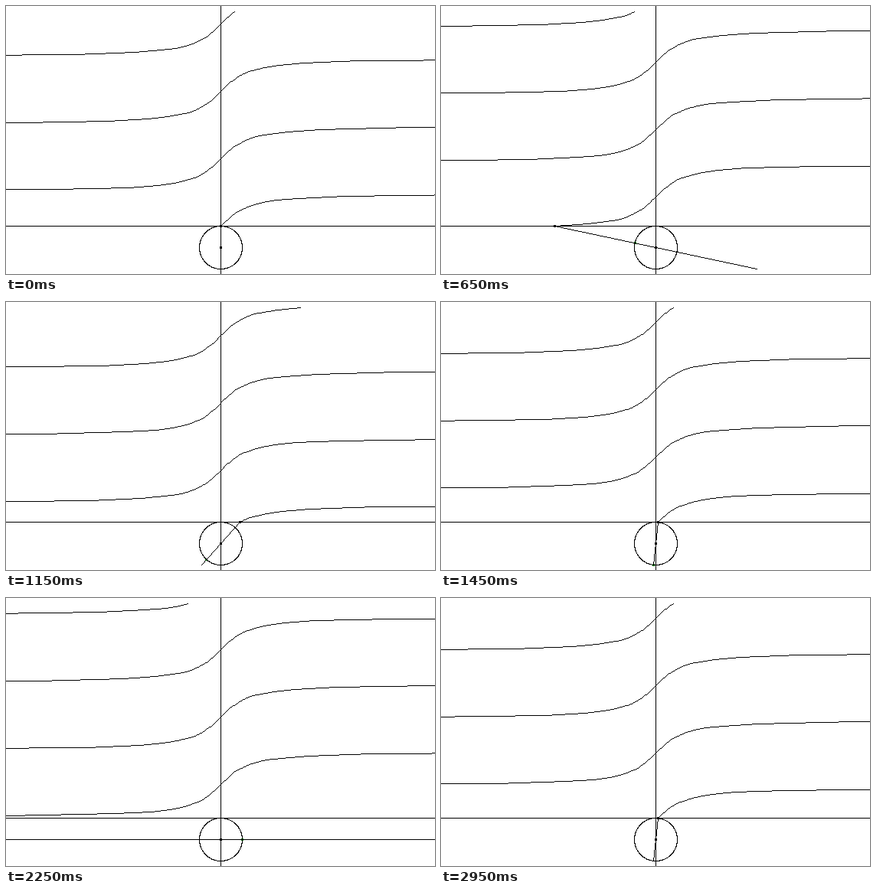
A matplotlib script that plays this animation: 560x350 px, repeating every 3 s.

```python
import numpy as np
import matplotlib.pyplot as plt
from matplotlib.animation import FuncAnimation

W, H, DPI = 560, 350, 100
FRAMES, INTERVAL = 60, 50
CX, CY, R = 280, 315, 28
TOP = CY - R
FAR = 1e5
BLACK, GREEN, WHITE = (0, 0, 0), (0, 160, 0), (255, 255, 255)

fig = plt.figure(figsize=(W / DPI, H / DPI), dpi=DPI, facecolor="white")
ax = fig.add_axes([0, 0, 1, 1])
ax.axis("off")


def plot(img, x, y, color=BLACK):
    """Set the pixels nearest to the given points."""
    x, y = np.rint(x).astype(int), np.rint(y).astype(int)
    ok = (x >= 0) & (x < W) & (y >= 0) & (y < H)
    img[y[ok], x[ok]] = color


def line(img, x0, y0, x1, y1):
    """One-pixel line without antialiasing."""
    x0, y0, x1, y1 = np.rint([x0, y0, x1, y1])
    n = int(max(abs(x1 - x0), abs(y1 - y0))) + 1
    plot(img, np.linspace(x0, x1, n), np.linspace(y0, y1, n))


def circle(img, x, y, r):
    a = np.linspace(0, 2 * np.pi, 16 * r)
    plot(img, x + r * np.cos(a), y + r * np.sin(a))


def dot(img, x, y, color=BLACK):
    dx, dy = np.mgrid[-1:2, -1:2]
    plot(img, np.rint(x) + dx, np.rint(y) + dy, color)


def projected(angle):
    return np.clip(CX - R * np.tan(angle), -FAR, FAR)


# Paper rolls upward by one radius per radian of rotation.
roll = np.linspace(0, 10, 101)
trace_y = TOP - R * roll


def draw(i):
    img = np.full((H, W, 3), WHITE, np.uint8)
    a = 2 * np.pi * i / FRAMES
    x = projected(a)

    dot(img, CX - R * np.sin(a), CY - R * np.cos(a), GREEN)
    line(img, 0, TOP, W - 1, TOP)
    line(img, CX, 0, CX, H - 1)
    circle(img, CX, CY, R)
    line(img, x, TOP, 2 * CX - x, TOP + 2 * R)

    xs = projected(a - roll)
    for k in range(len(xs) - 1):
        # Lift the pen where the curve wraps from right to left.
        if xs[k + 1] > xs[k]:
            line(img, xs[k], trace_y[k], xs[k + 1], trace_y[k + 1])

    dot(img, CX, CY)
    dot(img, x, TOP)
    return img


screen = ax.imshow(draw(0), interpolation="nearest", aspect="auto")


def update(i):
    screen.set_data(draw(i))
    return (screen,)


anim = FuncAnimation(fig, update, frames=FRAMES, interval=INTERVAL,
                     repeat=True, repeat_delay=0)
plt.show()
```
